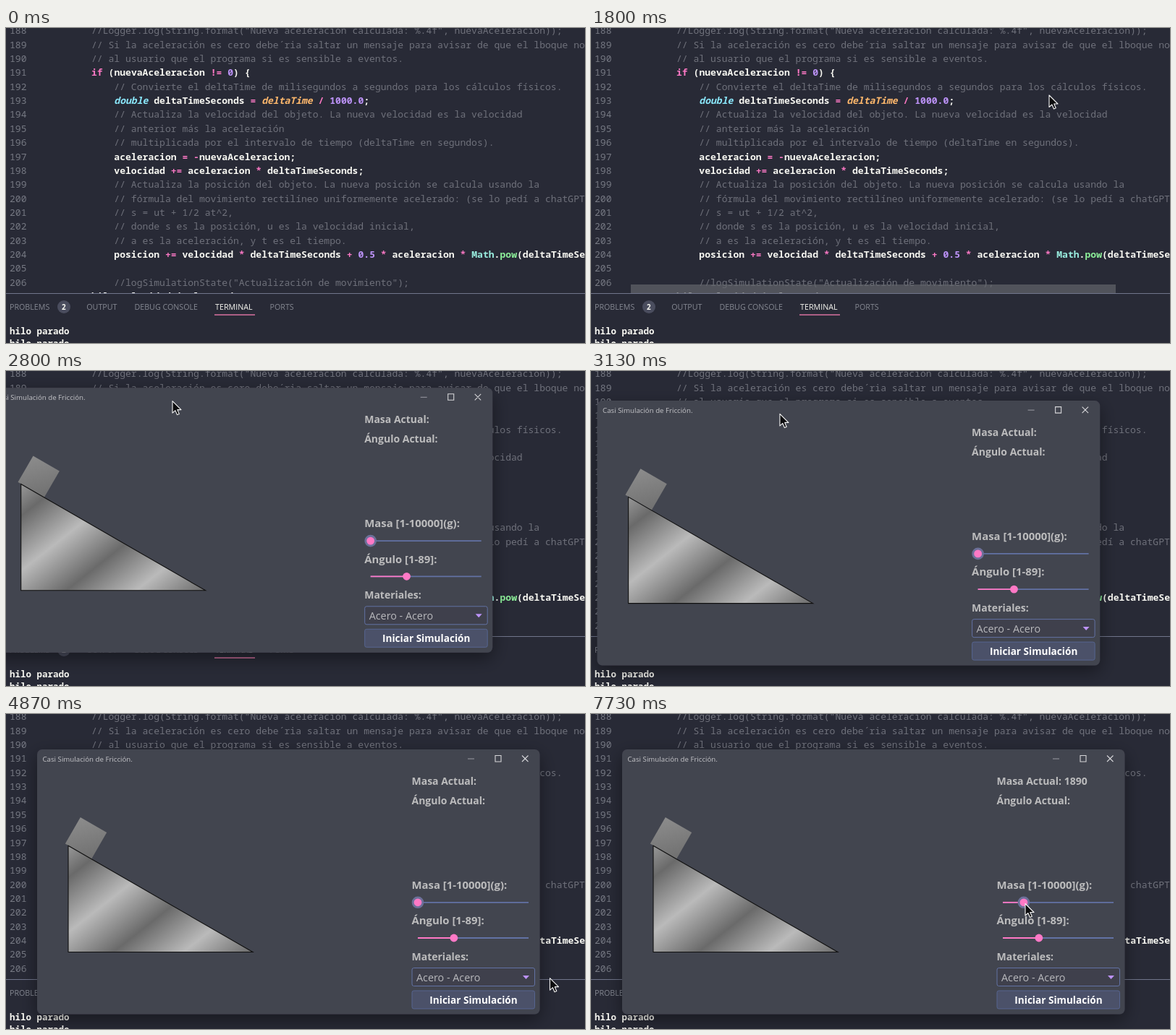
Animation, 800 px wide and 436 px high, one loop 8000 ms. Source, as an HTML page:

```html
<!DOCTYPE html>
<html lang="es">
<head>
<meta charset="utf-8">
<title>Simulación de fricción</title>
<style>
  html, body { margin: 0; width: 100%; height: 100%; overflow: hidden; background: #282a36; }
  svg { display: block; width: 800px; height: 436px; }
  text { white-space: pre; }
  .code { font-family: "Noto Sans Mono", "DejaVu Sans Mono", monospace; }
  .ui { font-family: "Open Sans", "Noto Sans", sans-serif; }
  .bold { font-weight: 700; }
</style>
</head>
<body>
<svg id="stage" viewBox="0 0 800 436" xmlns="http://www.w3.org/2000/svg">
  <defs>
    <linearGradient id="steel" gradientUnits="userSpaceOnUse" spreadMethod="reflect" x1="108" y1="209" x2="145" y2="256">
      <stop offset="0" stop-color="#6a6a6a"/>
      <stop offset="1" stop-color="#bababa"/>
    </linearGradient>
    <linearGradient id="block" x2="1" y2="1">
      <stop offset="0" stop-color="#8c8c8c"/>
      <stop offset="1" stop-color="#707070"/>
    </linearGradient>
    <filter id="shadow" x="-10%" y="-10%" width="120%" height="130%">
      <feDropShadow dx="0" dy="8" stdDeviation="12" flood-color="#000" flood-opacity=".42"/>
    </filter>
  </defs>
  <rect width="800" height="436" fill="#282a36"/>
  <g id="editor"></g>
  <rect id="scrollbar" x="55" y="355" width="670" height="12" fill="#63656b"/>
  <g id="panel"></g>
  <g id="win"></g>
  <path id="cursor" d="M0 0V16.5L3.9 13L6.5 19L9.3 17.8L6.8 12H12Z" fill="#0c0c0e" stroke="#f4f4f4" stroke-width="1.1" stroke-linejoin="round"/>
</svg>
<script>
const LOOP = 8000, STEP = 200 / 3;
const WHITE = "#f8f8f2", GREY = "#bcbcbd", PINK = "#ff79c6", BLUE = "#6272a4", PURPLE = "#bd93f9";
const $ = id => document.getElementById(id);

function add(parent, tag, attrs, content = "") {
  const node = document.createElementNS("http://www.w3.org/2000/svg", tag);
  for (const key in attrs) node.setAttribute(key, attrs[key]);
  node.textContent = content;
  return parent.appendChild(node);
}
const label = (parent, x, y, size, fill, content, cls = "ui") =>
  add(parent, "text", { x, y, fill, class: cls, "font-size": size }, content);

// Editor
const FIRST_LINE = 188, LINE_HEIGHT = 19.36, CODE_SIZE = 13.07, CHAR = CODE_SIZE * 0.6, CODE_X = 118;
const source = `
//Logger.log(String.format("Nueva aceleracion calculada: %.4f", nuevaAceleracion));
// Si la aceleración es cero debe´ria saltar un mensaje para avisar de que el lboque no
// al usuario que el programa si es sensible a eventos.
if (nuevaAceleracion != 0) {
    // Convierte el deltaTime de milisegundos a segundos para los cálculos físicos.
    double deltaTimeSeconds = deltaTime / 1000.0;
    // Actualiza la velocidad del objeto. La nueva velocidad es la velocidad
    // anterior más la aceleración
    // multiplicada por el intervalo de tiempo (deltaTime en segundos).
    aceleracion = -nuevaAceleracion;
    velocidad += aceleracion * deltaTimeSeconds;
    // Actualiza la posición del objeto. La nueva posición se calcula usando la
    // fórmula del movimiento rectilíneo uniformemente acelerado: (se lo pedí a chatGPT
    // s = ut + 1/2 at^2,
    // donde s es la posición, u es la velocidad inicial,
    // a es la aceleración, y t es el tiempo.
    posicion += velocidad * deltaTimeSeconds + 0.5 * aceleracion * Math.pow(deltaTimeSeconds, 2);

    //logSimulationState("Actualización de movimiento");
hilo.velocidadFinal(estado) {`;
const rules = [
  [/^\/\//, "#6f717b"],
  [/^(if|[-+*\/!]?=|[-+*\/])$/, PINK],
  [/^double$/, "#8be9fd", "italic"],
  [/^deltaTime$/, "#ffb86c", "italic"],
  [/^\d/, PURPLE],
  [/^Math$/, "#9aeee0"],
  [/^pow$/, "#8df09a"],
  [/./, WHITE]
];
const editor = $("editor");

source.trim().split("\n").forEach((line, i) => {
  const y = 8.3 + i * LINE_HEIGHT, indent = line.search(/\S|$/);
  label(editor, 5, y, CODE_SIZE, "#767983", FIRST_LINE + i, "code");
  const row = label(editor, CODE_X + indent * CHAR, y, CODE_SIZE, WHITE, "", "code");
  for (const token of line.trim().match(/\/\/.*|[\d.]+\d|\w+|[-+*\/!]?=|\s+|./g) || []) {
    const [, fill, style = "normal"] = rules.find(([pattern]) => pattern.test(token));
    const weight = token.startsWith("//") ? 400 : 600;
    add(row, "tspan", { fill, "font-weight": weight, "font-style": style }, token);
  }
});

// Terminal panel
const panel = $("panel");
add(panel, "rect", { y: 367, width: 800, height: 69, fill: "#282a36" });
add(panel, "path", { d: "M0 367.5H800", stroke: "#71768c" });
const tabs = label(panel, 5, 390, 10.7, "#858892", "");
["PROBLEMS", "OUTPUT", "DEBUG CONSOLE", "TERMINAL", "PORTS"].forEach((name, i) => {
  const fill = name === "TERMINAL" ? WHITE : "#858892";
  add(tabs, "tspan", { dx: i === 0 ? 0 : i === 1 ? 51 : 24, fill }, name);
});
add(panel, "circle", { cx: 80, cy: 386, r: 9, fill: "#4a4d5e" });
label(panel, 77, 389.7, 10, WHITE, "2", "ui bold");
add(panel, "path", { d: "M288 397H344", stroke: "#d8719f", "stroke-width": 1.4 });
for (const y of [424, 441])
  label(panel, 5, y, 12.5, WHITE, "hilo parado", "code bold");

// Simulation window, laid out where it comes to rest
const HOME = [43, 49], ANGLE = 30, COLUMN = 560.5, TRACK = 569, TRACK_LENGTH = 153;
const RAMP = { x: 86, bottom: 329.5, width: 255 };
RAMP.height = RAMP.width * Math.tan(ANGLE * Math.PI / 180);

const win = $("win");
add(win, "rect", { x: 43, y: 49, width: 694.5, height: 366.5, rx: 7, fill: "#434450", filter: "url(#shadow)" });
label(win, 50.5, 65.5, 9.7, "#c4c4c8", "Casi Simulación de Fricción.");
add(win, "path", { d: "M638 62H647", stroke: "#9c9ca4" });
add(win, "path", { d: "M676 57.5h8v8.5h-8ZM713 57.5l8.5 8.5m0 -8.5l-8.5 8.5", stroke: "#d5d5d8", fill: "none", "stroke-width": 1.1 });
add(win, "rect", { x: -21, y: -21, width: 42, height: 42, fill: "url(#block)", transform: `translate(110.5 171.8) rotate(${ANGLE})` });
add(win, "path", {
  d: `M${RAMP.x} ${RAMP.bottom}v${-RAMP.height}l${RAMP.width} ${RAMP.height}Z`,
  fill: "url(#steel)", stroke: "#101010", "stroke-width": 1.1
});

const heading = (y, content) =>
  label(win, COLUMN, y, content.includes("[") ? 14.9 : 14, GREY, content, "ui bold");
const massText = heading(97.8, "Masa Actual:");
heading(124.5, "Ángulo Actual:");
["Masa [1-10000](g):", "Ángulo [1-89]:", "Materiales:"].forEach((name, i) => heading(242 + i * 49.3, name));

function slider(y, focused) {
  const line = stroke =>
    add(win, "path", { d: `M${TRACK} ${y}h${TRACK_LENGTH}`, stroke, "stroke-width": 1.8 });
  line(BLUE);
  const filled = line(PINK);
  const halo = add(win, "circle", { cy: y, r: 8.3, fill: "#6c7099", opacity: focused ? 1 : 0 });
  const thumb = add(win, "circle", { cy: y, r: 5.4, fill: PINK });
  return fraction => {
    const x = TRACK + TRACK_LENGTH * fraction;
    filled.setAttribute("d", `M${TRACK} ${y}H${x}`);
    for (const dot of [halo, thumb]) dot.setAttribute("cx", x);
  };
}
const setMass = slider(260.8, true);
slider(310, false)((ANGLE - 1) / 89);

const field = (y, fill, stroke) =>
  add(win, "rect", { x: 561, y, width: 169.5, height: 25, rx: 2.5, fill, stroke });
field(351.5, "#3f404c", BLUE);
label(win, 567, 369.7, 14.35, "#b9b9bd", "Acero - Acero");
add(win, "path", { d: "M714 362h9l-4.5 5Z", fill: PURPLE });
field(383, "#4b5169", "#566590");
label(win, 646, 400.8, 13.6, "#ffffff", "Iniciar Simulación", "ui bold").setAttribute("text-anchor", "middle");

// Motion
const ramp = (t, from, to) => Math.min(1, Math.max(0, (t - from) / (to - from)));
const smooth = p => p * p * (3 - 2 * p);
const easeOut = (p, power) => 1 - (1 - p) ** power;
const mix = (a, b, p) => a + (b - a) * p;
const move = (node, [x, y]) => node.setAttribute("transform", `translate(${x} ${y})`);

const OPENED = [-22.3, 23.3], GRIP = [252.3, 18.3];
const DRAG = { from: 3000, to: 3467 };

function windowPlace(t) {
  const p = ramp(t, DRAG.from, DRAG.to), rise = 26 * (1 - ramp(t, 1867, 2000));
  return [mix(OPENED[0], HOME[0], easeOut(p, 1.9)), mix(OPENED[1], HOME[1], easeOut(p, 3.5)) + rise];
}

// The pointer eases through its legs and rests between them
const legs = [
  { from: 67, to: 867, a: [790, 357], b: [640, 440] },
  { from: 1667, to: 1800, a: [632, 410], b: [633, 93] },
  { from: 2467, to: 2800, a: [633, 93], b: [230, 42] },
  { from: 3867, to: 4067, a: [295, 67], b: [291, 67] },
  { from: 4333, to: 4533, a: [291, 67], b: [349, -20] },
  { from: 4800, to: 5333, a: [758, 368], b: [609, 314.5] },
  { from: 5950, to: 6200, a: [609, 314.5], b: [565, 257] },
  { from: 7200, to: 7733, a: [567, 258], b: [600, 262.5] }
];
function cursorPlace(t) {
  if (t >= 2800 && t < 3867) return windowPlace(t).map((v, n) => v + GRIP[n]);
  const leg = legs.filter(({ from }) => from <= t).pop();
  if (!leg) return [-99, -99];
  const p = smooth(ramp(t, leg.from, leg.to));
  return leg.a.map((v, n) => mix(v, leg.b[n], p));
}

function render(time) {
  const t = Math.floor(time / STEP + .06) * STEP + .5;
  move(win, windowPlace(t).map((v, n) => v - HOME[n]));
  win.setAttribute("opacity", ramp(t, 1867, 2000));
  move($("cursor"), cursorPlace(t));

  const hover = ramp(t, 67, 200) - ramp(t, 800, 1133) + ramp(t, 1667, 1800) - ramp(t, 1900, 2467);
  $("scrollbar").setAttribute("opacity", .7 * hover);

  const mass = Math.round(1890 * smooth(ramp(t, 7200, 7733)));
  massText.textContent = "Masa Actual:" + (mass ? " " + mass : "");
  setMass(mass / 10000);
}

const start = performance.now();
function tick() {
  render((performance.now() - start) % LOOP);
  requestAnimationFrame(tick);
}
tick();
</script>
</body>
</html>
```
